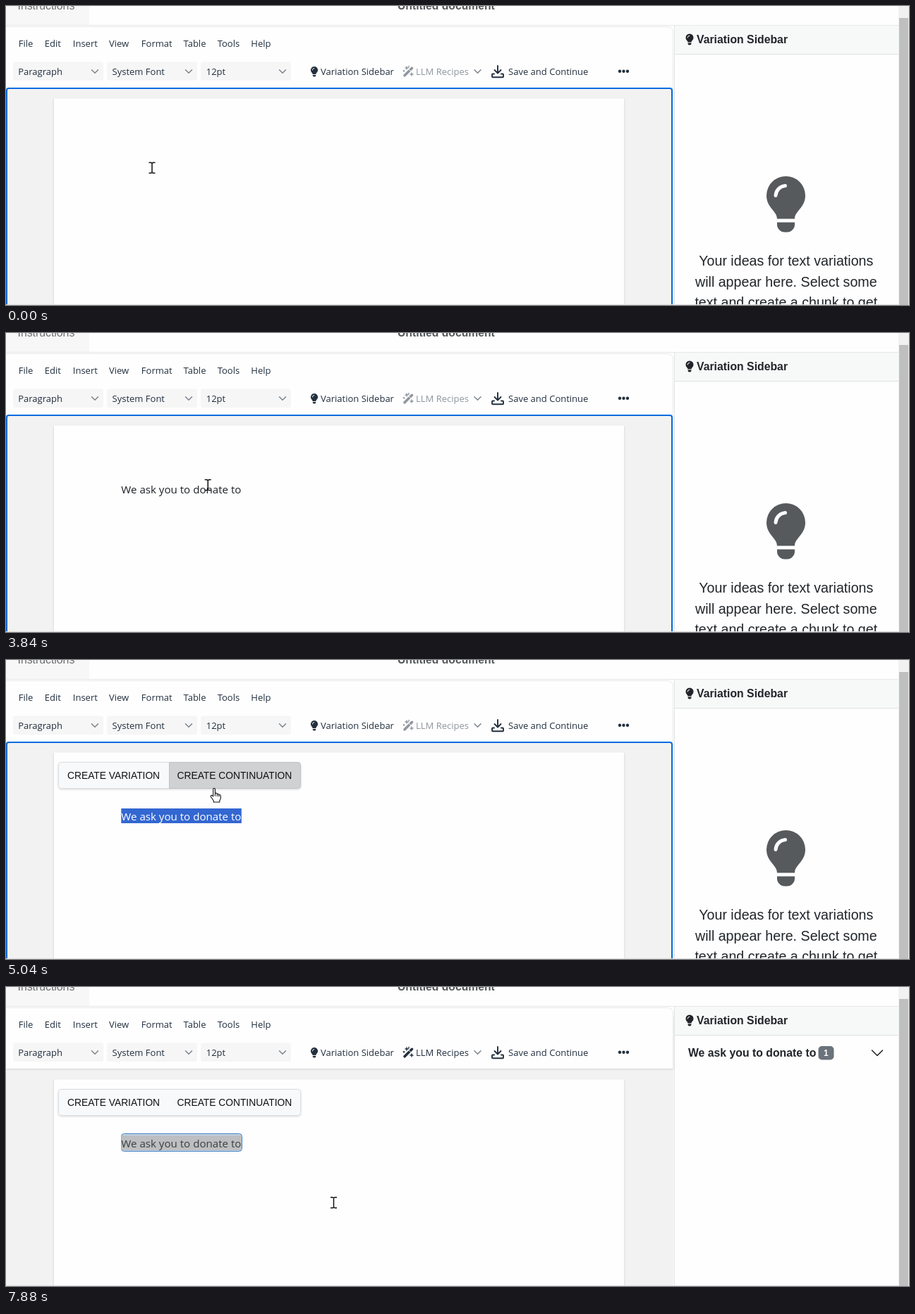
An HTML page for the animation above (8 s loop, 1280x425 px).

```html
<!DOCTYPE html>
<html lang="en">
<head>
<meta charset="utf-8">
<title>Document editor</title>
<style>
  html, body { margin: 0; height: 100%; overflow: hidden; background: #fff; }
  svg { display: block; width: 1280px; height: 425px; }
  text { white-space: pre; fill: #222f3e; font: 13.03px "Open Sans", "Noto Sans", sans-serif; }
  .arial, .arial text { font-family: "Liberation Sans", Arial, sans-serif; fill: #212529; }
  .bold { font-weight: 700; font-size: 15.8px; }
  .big text { font-size: 19.65px; text-anchor: middle; }
  .doc { font-size: 15.12px; fill: #1c2127; }
  #popup text { font-size: 13.8px; fill: #111; }
  .line { fill: none; stroke-linecap: round; stroke-linejoin: round; }
</style>
</head>
<body>
<svg viewBox="0 0 1280 425">
  <defs>
    <g id="bulb">
      <path d="M-12.5 33C-12.5 22-27.5 17-27.5 0A27.5 27.5 0 0 1 27.5 0C27.5 17 12.5 22 12.5 33Z"/>
      <path d="M-12.5 38H12.5V41A11 11 0 0 1 1.5 52H-1.5A11 11 0 0 1-12.5 41Z"/>
      <path class="line" d="M-14.5 0A14.5 14.5 0 0 1-1-14" stroke="#fff" stroke-width="5"/>
    </g>
    <path id="chevron" class="line" d="M-4.5-2.3 0 2.3 4.5-2.3" stroke="#7d858e" stroke-width="1.5"/>
    <filter id="soft" x="-10%" y="-20%" width="120%" height="150%">
      <feDropShadow dx="0" dy="1" stdDeviation="1.5" flood-opacity=".16"/>
    </filter>
    <clipPath id="selClip"><rect id="clipBox" y="205" height="35"/></clipPath>
  </defs>

  <rect width="1280" height="425" fill="#fefefe"/>

  <!-- top strip -->
  <rect width="118" height="27" fill="#f7f7f7"/>
  <path d="M0 27.5H1265" stroke="#e6e7e8"/>
  <text class="arial" x="16.5" y="5" style="font-size:15.8px;fill:#6b6e71">Instructions</text>
  <text class="arial bold" x="555" y="5" style="font-size:15.7px;fill:#55585b">Untitled document</text>

  <!-- editor body -->
  <rect y="116" width="946" height="309" fill="#f2f2f2"/>
  <rect x="68" y="131.5" width="808" height="310" fill="#fefefe" filter="url(#soft)"/>
  <g id="bar">
    <path id="barShade" d="M0 40H946V115.5H0Z" fill="#fefefe" filter="url(#soft)"/>
    <path d="M0 29.5H937Q945.5 29.5 945.5 38V116H0Z" fill="#fefefe"/>
    <path d="M0 29.5H937Q945.5 29.5 945.5 38V116" fill="none" stroke="#e8e9ea"/>
  </g>
  <g id="menu"></g>
  <g id="selects"></g>
  <use href="#bulb" transform="translate(437 91) scale(.185)" fill="#222f3e"/>
  <text x="446" y="98">Variation Sidebar</text>
  <g id="recipes">
    <text x="581" y="98">LLM Recipes</text>
    <path class="line" d="M565 98.8 575.5 88.3" stroke="#222f3e" stroke-width="3.6"/>
    <path d="M571.2 90.2 573.8 92.8" stroke="#fff"/>
    <path class="line" d="M568 86V90M566 88H570M575 95V99M573 97H577M564 91.5V93M563.3 92.2H564.8M571 85.5V87" stroke="#222f3e" stroke-width="1.4"/>
  </g>
  <use href="#chevron" x="668.5" y="93"/>
  <g class="line" stroke="#222f3e" stroke-width="1.9">
    <path d="M697 85V95M692.5 91 697 95.5 701.5 91"/>
    <path d="M692 96.5H690Q689 96.5 689 97.5V100.2Q689 101.2 690 101.2H704Q705 101.2 705 100.2V97.5Q705 96.5 704 96.5H702"/>
  </g>
  <text x="712" y="98">Save and Continue</text>
  <path class="line" d="M870 92.8h0M875.5 92.8h0M881 92.8h0" stroke="#222f3e" stroke-width="4.4"/>
  <path id="focus" d="M1 430V120Q1 117 4 117H941Q944 117 944 120V430" fill="none" stroke="#006ce0" stroke-width="2"/>

  <!-- sidebar -->
  <rect x="947" y="28" width="318" height="40" fill="#f7f9f9"/>
  <path d="M947.5 28V425M947 68.5H1265" stroke="#dfe1e3" fill="none"/>
  <g class="arial">
    <use href="#bulb" transform="translate(969 45) scale(.2)" fill="#212529"/>
    <text class="bold" x="979" y="53">Variation Sidebar</text>
    <g id="empty" class="big">
      <use href="#bulb" transform="translate(1105.5 269.5)" fill="#565a5d"/>
      <text x="1105.8" y="369">Your ideas for text variations</text>
      <text x="1105.8" y="398.5">will appear here. Select some</text>
      <text x="1105.8" y="428">text and create a chunk to get</text>
    </g>
    <g id="entry">
      <text class="bold" x="967" y="98.5">We ask you to donate to</text>
      <rect x="1151.5" y="84" width="22" height="19.5" rx="5" fill="#6a737b"/>
      <text class="bold" x="1159" y="98.3" style="font-size:12px;fill:#fff">1</text>
      <path class="line" d="M1227.5 90 1235 97.5 1242.5 90" stroke="#212529" stroke-width="1.6"/>
    </g>
  </g>

  <!-- document text -->
  <rect id="chunk" x="163.5" y="208.5" width="171" height="25" rx="4" fill="#c3d3e3" stroke="#3f82c4"/>
  <rect id="sel" y="211" height="21"/>
  <text id="typed" class="doc" x="163.3" y="228"></text>
  <text id="lit" class="doc" x="163.3" y="228" clip-path="url(#selClip)">We ask you to donate to</text>
  <rect id="caret" y="211" width="1.5" height="21" fill="#111"/>

  <g id="popup" class="arial">
    <rect x="74.5" y="145.5" width="343" height="37" rx="4" fill="#f8f9fb" stroke="#dcdee1" filter="url(#soft)"/>
    <path id="hover" d="M231.5 145.5H413.5Q417.5 145.5 417.5 149.5V178.5Q417.5 182.5 413.5 182.5H231.5Z" fill="#d0d1d2" stroke="#bfc1c3"/>
    <text x="87" y="169">CREATE VARIATION</text>
    <text x="242.5" y="169">CREATE CONTINUATION</text>
  </g>

  <path d="M0 424.5H1265" stroke="#dfdfdf"/>
  <rect x="1265" width="15" height="425" fill="#f1f1f1"/>
  <rect x="1266" y="17" width="13" height="408" fill="#bfbfbf"/>

  <!-- pointer -->
  <circle id="click" cx="337" cy="173" r="12" fill="#e9e22e" fill-opacity=".8"/>
  <g id="pointer">
    <path id="beam" d="M-4.5-7.5H-1.5L0-6.7 1.5-7.5H4.5M0-6.7V6.7M-4.5 7.5H-1.5L0 6.7 1.5 7.5H4.5" fill="none" stroke="#111" stroke-width="1.5"/>
    <path id="hand" class="line" d="M-2.6 3V-7.2Q-2.6-8.8-1.2-8.8T.2-7.2V-1.5Q2.6-2.5 3-.6 5.2-1.2 5.5.6 8-.2 8 2.4V5Q8 7.5 6.5 9V11H-2V9L-5.5 4Q-6.8 2-5.2 1.4-4 1.2-2.6 3ZM.2-1.5V2M3-.6V2.4M5.5.6V2.8" stroke="#111" stroke-width="1.1" style="fill:#fff"/>
  </g>
</svg>

<script>
const $ = id => document.getElementById(id);
const show = (id, on) => $(id).style.display = on ? '' : 'none';
const set = (id, attrs) => { for (const k in attrs) $(id).setAttribute(k, attrs[k]); };

const menu = { File: 17.8, Edit: 54.8, Insert: 94.8, View: 146, Format: 191.8, Table: 251.5, Tools: 299.7, Help: 347.3 };
$('menu').innerHTML = Object.entries(menu).map(([s, x]) => `<text x="${x}" y="58">${s}</text>`).join('');
$('selects').innerHTML = [['Paragraph', 10, 17.2], ['System Font', 143, 150.5], ['12pt', 276, 283.7]].map(([s, x, tx]) =>
  `<rect x="${x}" y="79.5" width="128" height="26.5" rx="3" fill="#f6f6f6"/>
   <text x="${tx}" y="98">${s}</text><use href="#chevron" x="${x + 116}" y="93"/>`).join('');

const LOOP = 8000, LEFT = 163.3, RIGHT = 333.8;
const phrase = $('lit').textContent;
// moment at which each character appears
const keyTimes = [60, 390, 650, 920, 920, 1120, 1180, 1460, 1600, 1800, 1910, 2030,
  2140, 2250, 2320, 2380, 2580, 2640, 2780, 2860, 2940, 3020, 3100];
// pointer path: time, x, y
const path = [[0, 207, 230], [3570, 207, 230], [3840, 286, 216], [4050, 338, 222], [4430, 150.5, 219],
  [4800, 150.5, 219], [5110, 338, 183], [6320, 338, 183], [6450, 327.5, 209.5], [6670, 327.5, 209.5],
  [6800, 327.5, 204.5], [7320, 327.5, 204.5], [7880, 464.5, 306.5], [LOOP, 464.5, 306.5]];

const ramp = (t, a, b) => Math.min(1, Math.max(0, (t - a) / (b - a)));
const between = (t, a, b) => t >= a && t < b;

function pointerAt(t) {
  const i = path.findIndex(p => p[0] > t), [a, x, y] = path[i - 1], [b, u, v] = path[i];
  const k = ramp(t, a, b);
  return [x + (u - x) * k, y + (v - y) * k];
}

function draw(t) {
  const [x, y] = pointerAt(t);
  const overButton = between(t, 5040, 6430);
  set('pointer', { transform: `translate(${x} ${y})` });
  show('hand', overButton);
  show('beam', !overButton);
  show('click', between(t, 5770, 5950));

  $('typed').textContent = phrase.slice(0, keyTimes.filter(k => k <= t).length);
  show('caret', between(t, 60, 3700));
  set('caret', { x: LEFT + $('typed').getComputedTextLength() + .6 });

  const selecting = t >= 4050, blurred = t >= 5770, chunked = t >= 5840;
  const from = t < 4430 ? Math.min(RIGHT, Math.max(LEFT, x)) : LEFT;
  const box = { x: from, width: RIGHT - from };
  show('sel', selecting);
  show('lit', selecting);
  set('sel', { ...box, fill: chunked ? '#bcbec0' : blurred ? '#c8c8c8' : '#3367d1' });
  set('clipBox', box);
  $('lit').style.fill = blurred ? '#3b3e42' : '#fff';
  show('typed', t < 4430);
  show('chunk', chunked);

  show('popup', t >= 4500);
  set('popup', { transform: t < 4850 ? 'translate(-109 -41)' : '' });
  set('hover', { opacity: t < 5040 ? 0 : t < 6380 ? 1 : 1 - ramp(t, 6380, 6590) ** 2 });

  set('focus', { opacity: t < 5770 ? 1 : t < 5840 ? .7 : t < 5910 ? .3 : 0 });
  show('barShade', chunked);
  set('recipes', { opacity: chunked ? 1 : .5 });
  show('empty', !chunked);
  show('entry', chunked);
}

function tick() {
  draw(performance.now() % LOOP);
  requestAnimationFrame(tick);
}
tick();
</script>
</body>
</html>
```
